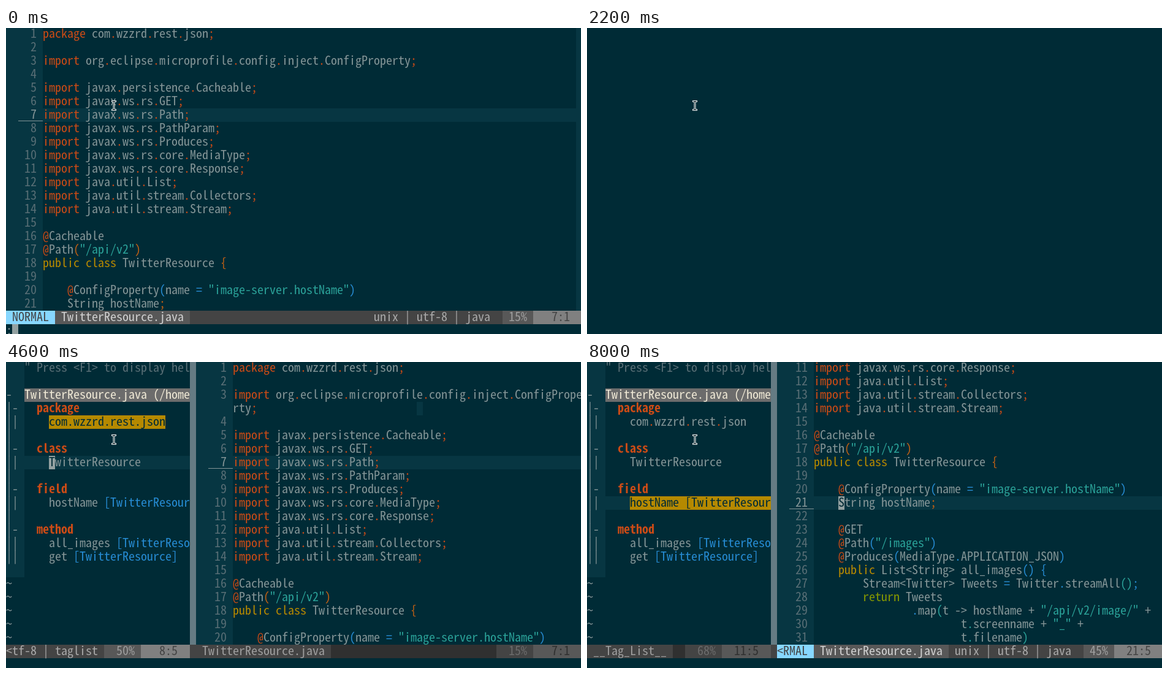
An HTML page that plays this animation: 938 px wide and 499 px high, repeating every 8700 ms.

```html
<!DOCTYPE html>
<html lang="en">
<head>
<meta charset="utf-8">
<title>Tag list in a text editor</title>
<style>
  html, body { margin: 0; width: 100%; height: 100%; overflow: hidden; background: #002b36; }
  svg { display: block; width: 938px; height: 499px; }
  text { white-space: pre; font-family: "Noto Sans Mono CJK JP", "Noto Sans Mono", "DejaVu Sans Mono", monospace; }
</style>
</head>
<body>
<svg id="terminal" viewBox="0 0 938 499" xmlns="http://www.w3.org/2000/svg">
  <g id="grid"></g>
  <path d="M172.5 118.5h7v2h-2.500v12h2.500v2h-7v-2h2.500v-12h-2.500z" fill="#001a21" stroke="#fff"/>
</svg>
<script>
(() => {
const LOOP = 8700, CELL = 10, ROW = 22;
const C = {
  bg: "#002b36", band: "#073642", dim: "#586e75", fg: "#839496", cursor: "#93a1a1",
  orange: "#cb4b16", yellow: "#b58900", green: "#859900", blue: "#268bd2", cyan: "#2aa198"
};
// Status bar greys, dark to light
const [G1, G2, G3, G4, G5, G6, G7, G8] =
  ["#303030", "#444444", "#585858", "#6c6c6c", "#808080", "#9e9e9e", "#a8a8a8", "#d0d0d0"];
const NEST = [C.orange, "#c06014", C.blue, C.cyan];
const KEYWORDS = {
  package: C.orange, import: C.orange, public: C.yellow, class: C.yellow, return: C.green
};

const SOURCE = `package com.wzzrd.rest.json;

import org.eclipse.microprofile.config.inject.ConfigProperty;

import javax.persistence.Cacheable;
import javax.ws.rs.GET;
import javax.ws.rs.Path;
import javax.ws.rs.PathParam;
import javax.ws.rs.Produces;
import javax.ws.rs.core.MediaType;
import javax.ws.rs.core.Response;
import java.util.List;
import java.util.stream.Collectors;
import java.util.stream.Stream;

@Cacheable
@Path("/api/v2")
public class TwitterResource {

    @ConfigProperty(name = "image-server.hostName")
    String hostName;

    @GET
    @Path("/images")
    @Produces(MediaType.APPLICATION_JSON)
    public List<String> all_images() {
        Stream<Twitter> Tweets = Twitter.streamAll();
        return Tweets
                .map(t -> hostName + "/api/v2/image/" +
                        t.screenname + "_" +
                        t.filename)`.split("\n");

// Fold marks, then the text of each tag list line
const TAGS = [
  ["", '" Press <F1> to display hel'], ["", ""],
  ["-", "TwitterResource.java (/home"],
  ["|-", "  package"], ["||", "    com.wzzrd.rest.json"], ["|", ""],
  ["|-", "  class"], ["||", "    TwitterResource"], ["|", ""],
  ["|-", "  field"], ["||", "    hostName [TwitterResour"], ["|", ""],
  ["|-", "  method"], ["||", "    all_images [TwitterReso"], ["||", "    get [TwitterResource]"],
  ["", ""]
];

// Each step changes the state at its time
const STEPS = [
  [0, { view: "full", cmd: ":", on: true, focus: "code", tag: 5, current: 5, jumped: false, keys: "" }],
  [100, { cmd: ":T" }], [400, { cmd: ":Tl" }], [700, { cmd: ":Tlis" }], [800, { cmd: ":Tlist" }],
  [1300, { on: false }], [1900, { on: true }],
  [2100, { cmd: "", on: false }], [2200, { view: "blank" }],
  [2300, { view: "split", on: true }], [2800, { on: false }], [3400, { on: true }],
  [3700, { keys: "^W" }], [3900, { keys: "", focus: "tags" }],
  [4300, { tag: 6 }], [4400, { tag: 7 }], [4600, { tag: 8 }],
  [5200, { tag: 9 }], [5300, { tag: 10 }], [5500, { tag: 11 }],
  [6100, { focus: "code", jumped: true, current: 11 }],
  [6700, { on: false }], [7300, { on: true }], [7800, { on: false }], [8000, { on: true }]
];

// Font size whose advance is one cell
const probe = document.createElement("canvas").getContext("2d");
probe.font = '100px "Noto Sans Mono CJK JP", "Noto Sans Mono", "DejaVu Sans Mono", monospace';
document.getElementById("terminal")
  .setAttribute("font-size", 100 * CELL / probe.measureText("0").width);

const clean = s => s.replace(/&/g, "&amp;").replace(/</g, "&lt;");
const rect = (x, y, w, h, fill) =>
  `<rect x="${x}" y="${y}" width="${w}" height="${h}" fill="${fill}"/>`;
const rowTop = row => row * ROW - 1;
const fillRow = (x0, x1, row, color) => rect(x0, rowTop(row), x1 - x0, ROW, color);
const write = (x, row, s, color, bold) => s.trim() &&
  `<text x="${x}" y="${row * ROW + 16}" fill="${color}"${bold ? ' font-weight="700"' : ""}>${clean(s)}</text>`;
const block = (x, row, ch, back, ink = C.bg) =>
  fillRow(x, x + CELL, row, back) + write(x, row, ch, ink);

// Colour every character; brackets and operators follow the nesting depth
let depth = 0;
function paint(line) {
  const cells = [];
  for (const tok of line.match(/"[^"]*"|\w+|./g) || []) {
    let color = KEYWORDS[tok] || C.fg;
    if (tok.length > 1 && tok[0] === '"') color = C.cyan;
    else if (tok === "@") color = C.orange;
    else if (/^[({]/.test(tok)) color = NEST[++depth];
    else if (/^[)}]/.test(tok)) color = NEST[depth--];
    else if (/^[.;=]/.test(tok)) color = NEST[depth];
    for (const ch of tok) cells.push({ ch, color });
  }
  return cells;
}
const painted = SOURCE.map(paint);

function writeCells(x, row, cells) {
  const runs = [];
  for (const { ch, color } of cells) {
    const last = runs[runs.length - 1];
    if (last && last.color === color) last.s += ch;
    else runs.push({ s: ch, color });
  }
  const spans = runs.map(r => `<tspan fill="${r.color}">${clean(r.s)}</tspan>`).join("");
  return `<text x="${x}" y="${row * ROW + 16}">${spans}</text>`;
}

function codePane(x, first, cursorLine) {
  const textX = x + 60, width = Math.ceil((938 - textX) / CELL);
  let out = rect(x, 0, 60, 461, C.band);
  if (x === 0) out += rect(930, 0, 8, 461, C.band);
  for (let row = 0, n = first; row < 21; n++) {
    const cells = painted[n - 1], here = n === cursorLine;
    if (here) out += fillRow(x + 20, 938, row, C.band)
      + rect(x + 20, rowTop(row) + 20, 40, 1, C.fg);
    out += write(x + 20, row, String(n).padStart(3), here ? C.fg : C.dim);
    for (let i = 0; i === 0 || i < cells.length; i += width, row++) {
      if (i) out += fillRow(textX + 300, textX + 310, row, C.band);
      out += writeCells(textX, row, cells.slice(i, i + width));
    }
  }
  return out;
}

function tagCells(body) {
  const scope = body.indexOf("[");
  return [...body].map((ch, i) => ({
    ch, color: scope >= 0 && i >= scope ? C.blue : ch === "." ? C.orange : C.fg
  }));
}

function tagPane(s) {
  let out = rect(0, 0, 30, 351, C.band) + fillRow(30, 300, s.tag - 1, C.band);
  TAGS.forEach(([fold, line], row) => {
    const body = line.trimStart(), indent = line.length - body.length, x = 30 + indent * CELL;
    out += write(0, row, fold, C.fg);
    if (row === 0) out += write(x, row, body, C.dim);
    else if (row === 2) out += fillRow(30, 300, row, G4) + write(x, row, body, "#eee8d5");
    else if (row + 1 === s.current)
      out += fillRow(x, x + body.length * CELL, row, C.yellow) + write(x, row, body, C.bg);
    else if (indent === 2) out += write(x, row, body, C.orange, true);
    else out += writeCells(x, row, tagCells(body));
  });
  for (let row = 16; row < 21; row++) out += write(0, row, "~", C.fg);
  return out + rect(300, 0, 10, 461, "#657b83");
}

// Status segments: start, end, background, ink, text start, text
const segments = list => list.map(([x0, x1, back, ink, x, s]) =>
  fillRow(x0, x1, 21, back) + (s ? write(x, 21, s, ink) : "")).join("");

const position = (x, end, percent, where, active) => segments([
  [x, end - 80, active ? G3 : G2, active ? G6 : G4, end - 120, percent],
  [end - 80, end, active ? G5 : G3, active ? G2 : G1, end - 20 - where.length * CELL, where]
]);

const codeStatus = (x, fileX, modeX, mode, percent, where) => segments([
  [x, fileX, "#87d7ff", G2, modeX, mode],
  [fileX, fileX + 220, G3, G8, fileX + 10, "TwitterResource.java"],
  [fileX + 220, 810, G2, G7, 600, "unix | utf-8 | java"]
]) + position(810, 940, percent, where, true);

function tagStatus(s) {
  const active = s.focus === "tags";
  const column = TAGS[s.tag - 1][1] ? 5 : 1;
  return segments(active
    ? [[0, 160, G2, G7, 0, "<tf-8 | taglist"]]
    : [[0, 140, G2, G6, 10, "__Tag_List__"], [140, 160, G1]])
    + position(160, 300, Math.floor(s.tag / 16 * 100) + "%", s.tag + ":" + column, active)
    + fillRow(300, 310, 21, G2);
}

function tagCursor(s) {
  const line = TAGS[s.tag - 1][1], x = line ? 70 : 30, ch = line[4] || " ";
  if (s.tag === s.current) return block(x, s.tag - 1, ch, C.bg, C.yellow);
  return block(x, s.tag - 1, ch, line && line[2] !== " " ? C.orange : C.cursor);
}

function draw(s) {
  if (s.view === "blank") return "";
  if (s.view === "full")
    return codePane(0, 1, 7) + codeStatus(0, 80, 10, "NORMAL", "15%", "7:1")
      + write(0, 22, s.cmd, C.fg)
      + (s.on ? block(s.cmd.length * CELL, 22, " ", C.cursor) : "");

  const where = s.jumped ? "21:5" : "7:1", percent = s.jumped ? "45%" : "15%";
  let out = codePane(310, s.jumped ? 11 : 1, s.jumped ? 21 : 7) + tagPane(s) + tagStatus(s);
  if (s.focus === "code") {
    out += codeStatus(310, 370, 310, "<RMAL", percent, where);
    if (s.on) out += s.jumped ? block(410, 10, "S", C.cursor) : block(370, 7, "i", C.orange);
  } else {
    out += segments([
      [310, 530, G2, G6, 320, "TwitterResource.java"], [530, 800, G1]
    ]) + position(800, 940, percent, where, false) + tagCursor(s);
  }
  return out + write(830, 22, s.keys, C.fg);
}

const grid = document.getElementById("grid");
const start = performance.now();
let shown = -1;
function tick() {
  const t = Math.max(0, performance.now() - start) % LOOP;
  const index = STEPS.filter(([at]) => at <= t).length - 1;
  if (index !== shown) {
    const state = Object.assign({}, ...STEPS.slice(0, index + 1).map(step => step[1]));
    grid.innerHTML = draw(state);
    shown = index;
  }
  requestAnimationFrame(tick);
}
tick();
})();
</script>
</body>
</html>
```
